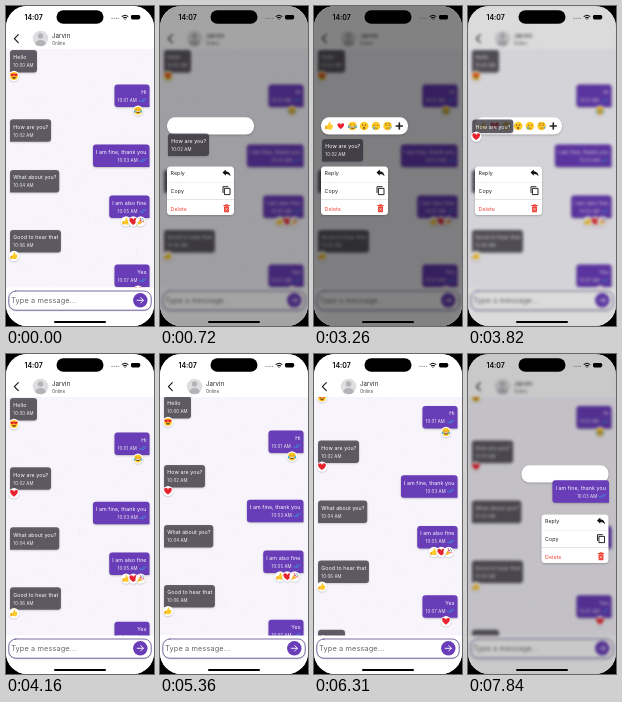
These frames come from a looping animation (148x320 px, 7.99 s). An HTML page with a canvas:

```html
<!DOCTYPE html>
<html lang="en">
<head>
<meta charset="utf-8">
<title>Chat reactions</title>
<style>
  html, body { margin: 0; width: 100%; height: 100%; overflow: hidden; background: #000; }
  canvas { display: block; width: 148px; height: 320px; }
</style>
</head>
<body>
<canvas id="stage"></canvas>
<script>
const W = 148, H = 320, LOOP = 7990, TAU = Math.PI * 2;
const BUBBLE_H = 22.5, ROW = 25.4, REACTION_ROW = 9.2;
const scale = window.devicePixelRatio || 1;

const stage = document.getElementById('stage');
const layer = document.createElement('canvas');
const [screen, chat] = [stage, layer].map(c => {
  c.width = W * scale;
  c.height = H * scale;
  const ctx = c.getContext('2d');
  ctx.scale(scale, scale);
  return ctx;
});
let g = screen; // context the helpers draw on

const messages = [
  { text: 'Hello', reactions: ['love'] },
  { text: 'Hi', mine: true, reactions: ['laugh'] },
  { text: 'How are you?', reactions: [] },
  { text: 'I am fine, thank you', mine: true, reactions: [] },
  { text: 'What about you?', reactions: [] },
  { text: 'I am also fine', mine: true, reactions: ['thumb', 'heart', 'party'] },
  { text: 'Good to hear that', reactions: ['thumb'] },
  { text: 'Yes', mine: true, reactions: ['heart'] },
  { text: 'Great', reactions: [] }
].map((m, i) => ({ ...m, time: `10:0${i} AM` }));

// The screen is refreshed only at these moments, holding still between them.
const ticks = [0, 500, 610, 720, 820, 930, 1050, 1190, 1350, 1510, 1600, 1680, 2890, 3070,
  3260, 3440, 3630, 3820, 4000, 4080, 4160, 5360, 5430,
  ...Array.from({ length: 9 }, (_, i) => 5570 + 92.5 * i), 7720, 7780, 7840];

const ramp = (t, start, length) => Math.min(1, Math.max(0, (t - start) / length));
const easeOut = x => 1 - (1 - x) ** 2;
const mix = (a, b, p) => a + (b - a) * p;

function label(text, x, y, size, color, { align = 'left', weight = 400, spacing = 0.09 } = {}) {
  g.font = `${weight} ${size}px Inter, Roboto, sans-serif`;
  g.letterSpacing = spacing + 'px';
  g.textAlign = align;
  g.fillStyle = color;
  g.fillText(text, x, y);
}

function box(x, y, w, h, radius, fill) {
  g.beginPath();
  g.roundRect(x, y, w, h, radius);
  g.fillStyle = fill;
  g.fill();
}

function disc(x, y, r, fill, ry = r) {
  g.beginPath();
  g.ellipse(x, y, r, ry, 0, 0, TAU);
  g.fillStyle = fill;
  g.fill();
}

function line(path, color, width) {
  g.strokeStyle = color;
  g.lineWidth = width;
  g.lineCap = g.lineJoin = 'round';
  g.stroke(new Path2D(path));
}

function shape(path, color) {
  g.fillStyle = color;
  g.fill(new Path2D(path));
}

function at(x, y, size, draw) {
  g.save();
  g.translate(x, y);
  g.scale(size, size);
  draw();
  g.restore();
}

function shadowed(draw, color = '#0004', blur = 2) {
  g.save();
  g.shadowColor = color;
  g.shadowBlur = blur * scale;
  g.shadowOffsetY = 0.7 * scale;
  draw();
  g.restore();
}

// Emoji live in a box from -1 to 1.
const HEART = 'M0 .9C-1.5-.1-1-.95-.5-.85Q-.1-.8 0-.4Q.1-.8 .5-.85C1-.95 1.5-.1 0 .9Z';
const INK = '#7d4e18', YELLOW = '#ffc928', TEAR = '#42aef0';
const eyes = (rx, ry) => [-0.35, 0.35].forEach(x => disc(x, -0.2, rx, INK, ry));
const emoji = {
  heart: () => shape(HEART, '#e8232f'),
  thumb: () => {
    shape('M-.5-.05L-.1-.5L0-1Q.4-1 .35-.3H.8Q1-.1 .8 .1Q.9 .35 .7 .45Q.7 .75 .5 .8H-.2L-.5 .65Z', YELLOW);
    shape('M-.95-.05H-.5V.75H-.95Z', '#f5ac1b');
  },
  love: () => {
    disc(0, 0, 1, YELLOW);
    [-0.45, 0.45].forEach(x => at(x, -0.25, 0.45, emoji.heart));
    shape('M-.5 .25H.5Q.4 .8 0 .8T-.5 .25Z', INK);
  },
  laugh: () => {
    disc(0, 0, 1, YELLOW);
    line('M-.6-.25Q-.4-.5-.2-.25M.2-.25Q.4-.5 .6-.25', INK, 0.12);
    shape('M-.55 .1H.55Q.5 .7 0 .7T-.55 .1Z', INK);
    shape('M-.5 .1H.5L.4 .32H-.4Z', '#fff');
    [-0.85, 0.85].forEach(x => disc(x, 0.2, 0.22, TEAR, 0.32));
  },
  wow: () => {
    disc(0, 0, 1, YELLOW);
    eyes(0.13, 0.18);
    disc(0, 0.45, 0.22, INK, 0.3);
  },
  cry: () => {
    disc(0, 0, 1, YELLOW);
    eyes(0.12, 0.17);
    line('M-.3 .55Q0 .3 .3 .55', INK, 0.13);
    disc(-0.45, 0.45, 0.2, TEAR, 0.35);
  },
  sad: () => {
    disc(0, 0, 1, YELLOW);
    eyes(0.12, 0.17);
    line('M-.35 .55Q0 .2 .35 .55M-.6-.5L-.25-.6M.6-.5L.25-.6', INK, 0.12);
    disc(0.65, 0.4, 0.17, TEAR, 0.27);
  },
  party: () => {
    shape('M-.9 .9L-.35-.4L.45 .4Z', '#f2b52c');
    line('M0-.2Q.1-.6-.1-.9M.3 .1Q.7-.1 .9 .1', '#e8384a', 0.2);
    [[0.5, -0.7, '#3fa9ee'], [0.8, -0.35, '#51b84a'], [0.25, -0.35, '#a452c8']]
      .forEach(([x, y, c]) => disc(x, y, 0.16, c));
  },
  plus: () => line('M-.7 0H.7M0-.7V.7', '#222', 0.38)
};
const choices = ['thumb', 'heart', 'laugh', 'wow', 'cry', 'sad', 'plus'];

function bubbleWidth(m) {
  g.font = '5.27px Inter, Roboto, sans-serif';
  g.letterSpacing = '0.09px';
  return Math.max(g.measureText(m.text).width, m.mine ? 29 : 21) + 6;
}

const bubbleX = m => m.mine ? 143.5 - bubbleWidth(m) : 4;

function drawBubble(m, x, y, height = BUBBLE_H, reactions = m.reactions) {
  const w = bubbleWidth(m), right = x + w - 3;
  shadowed(() => box(x, y, w, height, m.mine ? [3, 3, 0.5, 3] : [3, 3, 3, 0.5],
    m.mine ? '#693cb8' : 'rgba(54,50,60,.73)'));
  if (m.mine) label(m.text, right, y + 9.4, 5.27, '#fff', { align: 'right' });
  else label(m.text, x + 3.3, y + 9.4, 5.27, '#fff');
  if (height > 20) {
    label(m.time, m.mine ? right - 29 : x + 3.3, y + 17.3, 4.4, '#eee');
    if (m.mine) {
      at(right - 7, y + 15.5, 1, () => line('M0 .3L1.4 1.7L4.4-1.6M3 1.3L3.5 1.7L6.6-1.6', '#2fa9ea', 0.7));
    }
  }
  const first = m.mine ? (reactions.length > 1 ? 120 : 132) : x + 4;
  reactions.forEach((name, i) => {
    const cx = first + i * 7.3, cy = y + height + 3.5;
    shadowed(() => disc(cx, cy, 5.2, '#fff'), '#0003', 1.5);
    at(cx, cy, 3.9, emoji[name]);
  });
}

function topOf(index, scroll, reacted) {
  let y = 44 - scroll;
  for (let i = 0; i < index; i++) {
    y += ROW + (messages[i].reactions.length || (i === 2 && reacted) ? REACTION_ROW : 0);
  }
  return y;
}

function drawWallpaper() {
  let seed = 7;
  const random = () => (seed = seed * 16807 % 2147483647) / 2147483647;
  for (let i = 0; i < 130; i++) {
    disc(random() * W, 44 + random() * 237, 0.3 + random() * 0.4, '#e9e5f0');
  }
}

function drawHeader() {
  box(0, 0, W, 43, 0, '#fff');
  line('M12.3 28.7L8.4 32.7L12.3 36.7', '#111', 1.1);
  g.save();
  disc(34.5, 32.5, 7.8, '#dedee0');
  g.clip();
  disc(34.5, 30, 2.7, '#b4b4b8');
  disc(34.5, 38.6, 5.4, '#b4b4b8', 4.6);
  g.restore();
  label('Jarvin', 46, 32.3, 6.1, '#222');
  label('Online', 46, 38.9, 4.2, '#444');
}

function drawInput() {
  box(0, 281.5, W, 39, 0, '#fff');
  shadowed(() => box(2.8, 285, 142.4, 19.2, 7, '#fff'), '#4a357055', 1.5);
  g.strokeStyle = '#5f4a8c';
  g.lineWidth = 0.8;
  g.stroke();
  label('Type a message...', 5.2, 297.2, 7.3, '#68656d', { spacing: 0.15 });
  disc(134.3, 294.3, 7.2, '#693cb8');
  line('M131.2 294.3H137.3M134.7 291.6L137.4 294.3L134.7 297', '#fff', 0.9);
}

function drawChat(scroll, reacted, hidden) {
  g = chat;
  box(0, 0, W, H, 0, '#f7f5fb');
  drawWallpaper();
  messages.forEach((m, i) => {
    if (i === hidden) return;
    const reactions = i === 2 && reacted ? ['heart'] : m.reactions;
    drawBubble(m, bubbleX(m), topOf(i, scroll, reacted), BUBBLE_H, reactions);
  });
  drawHeader();
  drawInput();
}

function drawMenu(x) {
  shadowed(() => box(x, 160.5, 67, 48.5, 3.5, '#fff'));
  box(x, 176.2, 67, 0.4, 0, '#ccc');
  box(x, 193, 67, 0.4, 0, '#ccc');
  [['Reply', 168.8], ['Copy', 186.5], ['Delete', 204.6]].forEach(([text, y], i) =>
    label(text, x + 3.5, y, 5.27, i === 2 ? '#f04438' : '#222'));
  at(x + 59.5, 167, 1, () => shape('M-4-.4L-.7-3.6V-1.7Q3.7-1.3 4 3.2Q2.3 .8-.7 .9V2.8Z', '#111'));
  at(x + 59.5, 184.5, 1, () => {
    line('M-3.5 2V-3.8H1.5', '#111', 0.9);
    line('M-1.7-2.1H3.5V4.1H-1.7Z', '#111', 0.9);
  });
  at(x + 59.5, 202.3, 1, () => {
    box(-2.5, -2, 5, 6, 0.7, '#f04438');
    box(-3.2, -3.4, 6.4, 1, 0, '#f04438');
    box(-1.2, -4, 2.4, 1, 0, '#f04438');
    line('M-.9 .1L.9 2M.9 .1L-.9 2', '#fff', 0.6);
  });
}

function drawPicker(x, t, opened) {
  shadowed(() => box(x, 111.3, 87, 17.3, 8, '#fff'));
  choices.forEach((name, i) => {
    const pop = easeOut(ramp(t, opened + 615 + i * 60, 240));
    const press = name === 'heart' ? 1 - 0.35 * Math.sin(Math.PI * ramp(t, 2800, 600)) : 1;
    if (pop > 0) at(x + 8.1 + i * 11.7, 120, 4.3 * pop * press, emoji[name]);
  });
}

function drawStatusBar() {
  label('14:07', 18.5, 13.6, 7, '#000', { weight: 600, spacing: 0 });
  box(50.5, 4.2, 47, 13.6, 6.8, '#000');
  for (let i = 0; i < 4; i++) disc(106 + i * 2.1, 12.3, 0.55, '#555');
  line('M116 10.3Q119 7.8 122 10.3M117.3 11.8Q119 10.5 120.7 11.8', '#000', 1);
  disc(119, 13.1, 0.7, '#000');
  box(125, 8.9, 9, 4.6, 1.4, '#000');
  box(134.4, 10.4, 0.6, 1.6, 0.3, '#777');
  box(48, 315, 52, 1.9, 1, '#000');
}

function render(t) {
  const second = t >= 7688;
  const opened = second ? 7688 : 425;
  const closing = !second && t >= 3600;
  const fade = closing ? (1 - ramp(t, 3600, 560)) ** 2.5 : easeOut(ramp(t, opened, 620));
  const veil = Math.min(1, fade * 4); // blur and panels settle well before the dimming
  const flight = closing ? 1 - easeOut(ramp(t, 3600, 250)) : fade;
  const reacted = t >= 4080;
  const flying = flight > 0 || (closing && !reacted);
  const scroll = 26.6 * easeOut(ramp(t, 5320, 990));
  const index = second ? 3 : 2;

  drawChat(scroll, reacted, flying ? index : -1);

  g = screen;
  box(0, 0, W, H, 0, '#000');
  g.save();
  g.beginPath();
  g.roundRect(0, 0, W, H, 21);
  g.clip();
  box(0, 0, W, H, 0, '#f7f5fb');
  if (veil > 0) g.filter = `blur(${1.5 * veil * scale}px)`;
  g.drawImage(layer, 0, 0, W, H);
  g.filter = 'none';
  box(0, 0, W, H, 0, `rgba(0,0,0,${0.49 * fade})`);

  if (veil > 0) {
    g.globalAlpha = veil;
    drawPicker(second ? 53.5 : 7, t, opened);
    drawMenu(second ? 73.5 : 7);
    g.globalAlpha = 1;
  }
  if (flying) {
    const m = messages[index], home = bubbleX(m);
    const height = closing ? BUBBLE_H - 9 * (1 - flight) : BUBBLE_H;
    // The bubble travels on an arc: sideways first, then down.
    const x = mix(home, m.mine ? home - 2.8 : 8, easeOut(easeOut(flight)));
    const y = mix(topOf(index, scroll, reacted), 133, flight);
    drawBubble(m, x, y, height, closing ? ['heart'] : []);
  }
  drawStatusBar();
  g.restore();
}

const start = performance.now();
function frame() {
  const t = (performance.now() - start) % LOOP;
  render(ticks.findLast(tick => tick <= t));
  requestAnimationFrame(frame);
}
frame();
</script>
</body>
</html>
```
